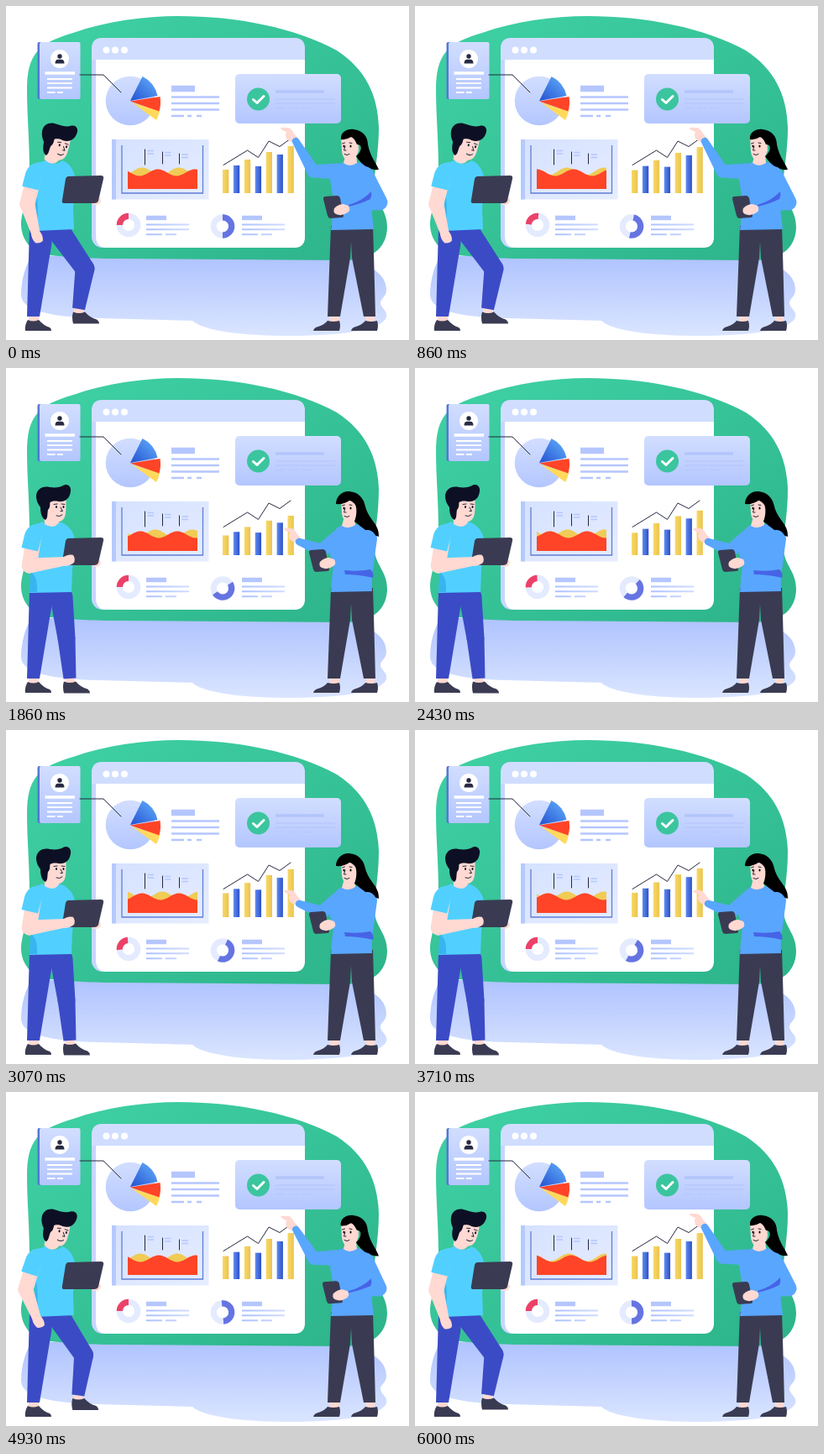
An HTML page for the animation above (6070 ms loop, 480x398 px).

```html
<!DOCTYPE html>
<html lang="en">
<head>
<meta charset="utf-8">
<title>Team dashboard</title>
<style>
html, body { margin: 0; width: 100%; height: 100%; overflow: hidden; background: #fff; }
svg { display: block; width: 480px; height: 398px; }
.skin { fill: #ffd9d2; }
.hair { fill: #0d1024; }
.black { fill: #000; }
.line { fill: none; stroke: #25283f; stroke-width: 1; stroke-linecap: round; stroke-linejoin: round; }
.dark { fill: #3a3b52; }
.sky { fill: #51d0ff; }
.blue { fill: #59a6ff; }
.jean { fill: #3b4bc6; }
.text { stroke: #b5c6ff; fill: none; }
</style>
</head>
<body>
<svg viewBox="0 0 480 398">
  <defs>
    <linearGradient id="green" x2="1" y2="1"><stop stop-color="#3fd2a5"/><stop offset="1" stop-color="#2db389"/></linearGradient>
    <linearGradient id="ground" x2="0" y2="1"><stop stop-color="#afc3ff"/><stop offset="1" stop-color="#dae5ff"/></linearGradient>
    <linearGradient id="pale" x2="0" y2="1"><stop stop-color="#d2deff"/><stop offset="1" stop-color="#b3c6ff"/></linearGradient>
    <linearGradient id="panel" x2="1" y2="1"><stop stop-color="#d5e1ff"/><stop offset="1" stop-color="#e6edff"/></linearGradient>
    <linearGradient id="slice" y1="1" x2="1" y2="0"><stop stop-color="#2450cf"/><stop offset="1" stop-color="#65b4ff"/></linearGradient>
    <linearGradient id="fade"><stop stop-color="#adc1ff"/><stop offset="1" stop-color="#d0dcff"/></linearGradient>
    <linearGradient id="gold"><stop stop-color="#f7d966"/><stop offset="1" stop-color="#ecc350"/></linearGradient>
    <linearGradient id="navy"><stop stop-color="#5f8cf0"/><stop offset="1" stop-color="#2d50c8"/></linearGradient>
  </defs>

  <path fill="url(#ground)" d="M30 298C20 316 18 333 18 345C19 362 50 371 110 372L222 375C235 388 290 393 335 393C400 393 446 387 453 371C455 363 447 361 446 354C446 348 453 347 453 338C453 320 435 308 400 298Z"/>
  <path fill="url(#green)" d="M25 100C25 58 38 44 80 32C120 18 165 12 205 12C275 12 345 26 394 53C428 75 443 106 444 145C444 180 437 202 439 219C442 237 454 243 454 264C453 290 435 303 400 303L130 301C95 301 75 299 50 297C30 294 18 278 18 260C18 245 28 225 28 195C28 160 25 130 25 100Z"/>

  <!-- window -->
  <rect x="102" y="38" width="254" height="250" rx="13" fill="#c6d5ff"/>
  <path fill="#fff" d="M107 64H356V275Q356 288 343 288H120Q107 288 107 274Z"/>
  <path fill="#d0ddff" d="M102 64V51Q102 38 115 38H343Q356 38 356 51V64Z"/>
  <g fill="#fff"><circle cx="119.500" cy="52.500" r="4"/><circle cx="130" cy="52.500" r="4"/><circle cx="141" cy="52.500" r="4"/></g>

  <!-- profile card -->
  <rect x="37.500" y="43" width="8" height="68" rx="2" fill="#5576d8"/>
  <rect x="40" y="43" width="48.500" height="68" rx="2" fill="url(#pale)"/>
  <circle cx="64" cy="63" r="11" fill="#fff"/>
  <circle cx="64" cy="60" r="2.700" fill="#272a42"/>
  <path fill="#272a42" d="M58.500 68.500Q58.500 63.800 62 63.800H66Q69.500 63.800 69.500 68.500Z"/>
  <path stroke="#fff" stroke-width="3.500" d="M46.500 80H82"/>
  <path stroke="#fff" stroke-width="1.800" d="M49 87H79M49 92.200H79M49 97.500H79M49 103H58.500M61 103H68"/>

  <!-- pie -->
  <circle cx="148" cy="113" r="29.300" fill="url(#pale)"/>
  <path fill="url(#slice)" d="M148 113L162.500 84Q177 91 180.500 107Z"/>
  <path fill="#ffd95c" d="M150 115L183 125Q182 131 179 136Z"/>
  <path fill="#ff4427" d="M148 113.500L183.500 108Q185 117 182.500 125.500Z"/>
  <path class="line" d="M88 82H116L137 103"/>

  <g class="text">
    <path stroke-width="7.500" d="M197 98.500H225"/>
    <path stroke-width="2.600" d="M197 108.500H254M197 116H254M197 123.500H254M197 131H212M216 131H221M227 131H233"/>
    <g id="note">
      <path stroke-width="5.500" d="M167 252.500H191"/>
      <path stroke="url(#fade)" stroke-width="2" d="M167 260.500H218M167 266.300H218M167 272.300H186M190 272.300H203"/>
    </g>
    <use href="#note" x="114"/>
  </g>

  <!-- message card -->
  <rect x="273" y="81" width="126" height="59" rx="5" fill="url(#pale)"/>
  <circle cx="300.500" cy="111" r="13.500" fill="#3bc59e"/>
  <path d="M294.500 111.500L299 115.500L307 107.500" fill="none" stroke="#fff" stroke-width="3" stroke-linecap="round" stroke-linejoin="round"/>
  <path stroke="#b3c5fb" stroke-width="3.500" d="M321 102H379"/>
  <path stroke="#b6c8fd" stroke-width="1.500" d="M321 111H392M321 116H392M321 121.500H332M337 121.500H347M351 121.500H365"/>

  <!-- area chart -->
  <rect x="126" y="159" width="115.500" height="71.500" fill="url(#panel)"/>
  <rect x="126" y="159" width="5" height="71.500" fill="#b6c9fc"/>
  <path fill="none" stroke="#5f7fd6" stroke-width="1.300" d="M138 166V223H234.500V166"/>
  <path id="waveBack" fill="#f0cb55"/>
  <path id="waveFront" fill="#ff4427"/>
  <path class="line" stroke-width=".8" d="M165.500 171V189M186.500 174V188M206.500 176V188"/>
  <path class="text" stroke-width="1.500" d="M168.500 172.500H176M168.500 176H176M189 174.500H196.500M189 178H196.500M209.500 177H217M209.500 180.500H217"/>

  <!-- bar chart -->
  <g id="bars"></g>
  <path class="line" d="M259 189.500L287.500 172L300.500 180.500L313 161L326 167.500L339 158"/>

  <!-- rings -->
  <g fill="none" stroke-width="7.200">
    <circle cx="146" cy="261" r="10.700" stroke="#e4ebff"/>
    <circle id="ringPink" cx="146" cy="261" r="10.700" stroke="#ec4168" pathLength="4" stroke-dasharray="1 3"/>
    <circle cx="258" cy="262.500" r="10.700" stroke="#e4ebff"/>
    <circle id="ringBlue" cx="258" cy="262.500" r="10.700" stroke="#6674e2" pathLength="4" stroke-dasharray="2 2"/>
  </g>

  <!-- man -->
  <path class="skin" id="manAnkle"/>
  <path class="jean" id="manThigh"/><path class="jean" id="manShank"/>
  <path class="dark" id="manShoe" d="M0 1Q7 4 14 1Q20 8 28 10Q31 12 31 15H0Q-2 7 0 1Z"/>
  <path class="skin" d="M27 368H39V378H27Z"/>
  <path class="jean" d="M28 265H56Q55 285 51 304L40 370H25Z"/>
  <path class="dark" d="M26 374Q32 377 39 374Q45 381 52 383Q54 384 54 387H23Q22 380 26 374Z"/>
  <path class="sky" id="manTorso"/>
  <path fill="#38b5f0" id="manShade"/>
  <g id="manHead">
    <path class="skin" d="M45 172L62 176L63 184Q57 193 46 186Z"/>
    <path class="skin" d="M47 156L71 154C72 161 71.500 167 71 173C70 181 65 184 60 183C55 182 51 180 47 176Z"/>
    <path class="hair" d="M36 153C36 145 43 140 52 142C59 143 65 142 68 140C74 137 78 142 77 147C76 156 70 160 62 159C58 158 54 159 52.500 160C52 163 53 166 50 169C49 174 50 179 47 181C42 179 41 171 41 166C38 162 36 158 36 153Z"/>
    <path class="line" stroke-width=".9" d="M57 162.500L61 162M66 162L70 162.500M65 166L67.500 170.500H65M60 176Q64 178 67 175"/>
    <g id="manEyes" class="hair"><ellipse cx="60" cy="165.500" rx="1" ry="1.500"/><ellipse cx="68.500" cy="165.500" rx="1" ry="1.500"/></g>
  </g>
  <path class="skin" d="M103 228Q113 227 113 232Q112 237 106 237L102 235Z"/>
  <path class="dark" d="M74 203L113 202Q117 202 116 206L110 232Q109 235 105 235L69 235Q66 235 67 231L71 206Q72 203 74 203Z"/>
  <path class="skin" id="manUpper"/><path class="skin" id="manFore"/>
  <path class="skin" id="manHand" d="M-4 -5Q3 -8 9 -5Q11 0 8 4Q2 7 -4 5Z"/>
  <path class="sky" id="manSleeve"/>

  <!-- woman -->
  <path class="skin" d="M386 368H397V378H386ZM429 368H439V378H429Z"/>
  <path class="dark" d="M387 262H412L410 300L398 370H383ZM410 262H437Q438 290 440 370H426L412 300Z"/>
  <path class="dark" id="shoe" d="M383 375Q390 377 397 375Q399 381 397 387H366Q367 383 372 382Q379 380 383 375Z"/>
  <use href="#shoe" x="45"/>
  <path class="blue" id="torso"/>
  <path class="skin" id="neck"/>
  <path class="skin" d="M399 156L419 155L420 172Q417 184 408 184Q401 183 400 173Z"/>
  <path class="line" stroke-width=".9" d="M400.500 164L403.500 163M409 163L412 163.500M404 167L402.500 172H405M403 176.500Q406 179 409 176.500"/>
  <g class="black"><ellipse cx="402.500" cy="167" rx="1" ry="1.500"/><ellipse cx="410.500" cy="167" rx="1" ry="1.500"/></g>
  <path class="black" id="hair"/>
  <path class="skin" id="hand" d="M5 -1L-2 -9Q-6 -17 -11 -16Q-18 -17 -18 -15Q-17 -13 -11 -11Q-13 -7 -11 -3Q-8 1 -3 1L1 4Z"/>
  <path class="blue" id="upper"/><path class="blue" id="fore"/>
  <path class="blue" id="backUpper"/><path class="blue" id="backFore"/>
  <path fill="#4664e6" id="fold"/>
  <g id="phone">
    <path class="dark" d="M380 227L394 226Q397 226 398 229L402 250Q402 252 400 252L386 253Q384 253 383 250L378 230Q378 227 380 227Z"/>
    <path class="skin" d="M391 241Q396 236 402 236L408 238Q411 243 407 246Q400 251 393 248Q389 246 391 241Z"/>
  </g>
</svg>
<script>
const LOOP = 6070, STEP = LOOP / 85;
const $ = id => document.getElementById(id);
const set = (id, name, value) => $(id).setAttribute(name, value);
const lerp = (a, b, p) => a + (b - a) * p;
const point = (a, b, p) => [lerp(a[0], b[0], p), lerp(a[1], b[1], p)];
const move = (id, [x, y], more = '') => set(id, 'transform', `translate(${x} ${y}) ${more}`);

// Blend two paths that share the same commands.
function morph(a, b, p) {
  const nums = b.match(/-?[\d.]+/g);
  let i = 0;
  return a.replace(/-?[\d.]+/g, n => lerp(+n, +nums[i++], p).toFixed(2));
}

// Tapered limb, round at the start and round or flat at the end.
function limb(a, b, wa, wb, flat = false) {
  const d = Math.atan2(b[1] - a[1], b[0] - a[0]) + Math.PI / 2;
  const at = (c, r) => (c[0] + r * Math.cos(d)).toFixed(2) + ' ' + (c[1] + r * Math.sin(d)).toFixed(2);
  const ra = wa / 2, rb = wb / 2;
  const end = flat ? 'L' : `A${rb} ${rb} 0 0 1 `;
  return `M${at(a, -ra)}L${at(b, -rb)}${end}${at(b, rb)}L${at(a, ra)}A${ra} ${ra} 0 0 1 ${at(a, -ra)}Z`;
}

const polar = ([x, y], r, deg) => [x + r * Math.cos(deg * Math.PI / 180), y + r * Math.sin(deg * Math.PI / 180)];

function ease(x) {
  x = Math.max(0, Math.min(1, x));
  return x < .5 ? 4 * x ** 3 : 1 - 4 * (1 - x) ** 3;
}

function track(keys, t) {
  let i = 0;
  while (i < keys.length - 2 && t >= keys[i + 1][0]) i++;
  const [t0, a] = keys[i], [t1, b] = keys[i + 1];
  return lerp(a, b, (1 - Math.cos(Math.PI * (t - t0) / (t1 - t0))) / 2);
}

const KEYS = {
  bar: [[0, 1], [430, .93], [860, .98], [1350, 1.04], [1860, .84], [2450, .95], [3070, 1.02], [3500, 1.07], [4000, .9], [4430, .95], [4930, .98], [5500, 1.05], [6000, .98], [LOOP, 1]],
  blue: [[0, 0], [860, 12], [1860, 57], [3070, 25], [4430, 38], [4930, -5], [5500, -12], [LOOP, 0]],
  pink: [[0, 0], [860, 5], [1860, 0], [3070, -5], [4430, 8], [4930, 0], [LOOP, 0]],
  front: [[0, 181], [860, 189], [1860, 204], [3070, 206], [4430, 196], [4930, 182], [6000, 186], [LOOP, 181]],
  back: [[0, 162], [860, 181], [1860, 178], [3070, 186], [4430, 172], [4930, 160], [6000, 183], [LOOP, 162]]
};

const BARS = [28, 33, 40, 32, 49, 46, 56].map((h, i) => {
  const r = document.createElementNS('http://www.w3.org/2000/svg', 'rect');
  r.setAttribute('x', 258 + i * 12.92);
  r.setAttribute('width', 7.3);
  r.setAttribute('fill', i % 2 ? 'url(#navy)' : 'url(#gold)');
  $('bars').append(r);
  return { r, h };
});

function wave(peak, amp, mid) {
  let d = 'M145 218';
  for (let x = 145; x <= 228; x++) d += `L${x} ${(mid - amp * Math.cos((x - peak) * 2 * Math.PI / 44)).toFixed(2)}`;
  return d + 'V218Z';
}

function drawCharts(t) {
  const k = track(KEYS.bar, t);
  for (const { r, h } of BARS) {
    r.setAttribute('y', 223 - h * k);
    r.setAttribute('height', h * k);
  }
  set('ringBlue', 'transform', `rotate(${track(KEYS.blue, t) - 90} 258 262.5)`);
  set('ringPink', 'transform', `rotate(${track(KEYS.pink, t) + 180} 146 261)`);
  set('waveBack', 'd', wave(track(KEYS.back, t), 4.5, 197));
  set('waveFront', 'd', wave(track(KEYS.front, t), 4, 198.5));
}

function drawMan(p, t) {
  const hip = [66, 273], knee = point([94, 313], [72, 322], p), ankle = point([86.5, 361], [76, 370], p);
  set('manThigh', 'd', limb(hip, knee, 27, lerp(23, 21, p)));
  set('manShank', 'd', limb(knee, ankle, lerp(23, 21, p), 15, true));
  set('manAnkle', 'd', limb(ankle, [ankle[0] + .5, ankle[1] + 6], 11, 11, true));
  move('manShoe', point([80, 363.5], [69, 372.5], p));

  set('manTorso', 'd', morph(
    'M47 184C55 189 62 189 67 184C77 187 82 198 83 210L80 240L81 266L36 268C36 250 34 235 33 215L36 195C36 190 40 186 47 184Z',
    'M43 183C50 188 57 188 62 183C73 185 82 194 83 210L79 240L78 267L28 268C30 250 30 235 30 215L33 195C34 190 38 185 43 183Z', p));
  set('manShade', 'd', morph('M36 222Q40 245 36 267L36 267L35 235Z', 'M29 243Q38 247 37 267L28 267L29 245Z', p));

  const swing = Math.sin(Math.PI * p) * 16;
  const shoulder = point([35, 197], [34, 196], p);
  const elbow = polar(shoulder, 40, lerp(104, 99, p) + swing);
  const hand = polar(elbow, lerp(39, 45, p), lerp(74, -7, p));
  set('manUpper', 'd', limb(shoulder, elbow, 18, 18));
  set('manFore', 'd', limb(elbow, hand, 18, 10));
  move('manHand', hand, `rotate(${lerp(70, -15, p)})`);
  const deg = lerp(104, 103, p) + swing;
  const cuff = polar(shoulder, 21, deg);
  const side = s => polar(cuff, s, deg + 90).join(' ');
  const [x, y] = shoulder;
  set('manSleeve', 'd', `M${x + 8} ${y - 11}Q${x - 8} ${y - 11} ${x - 12} ${y + 3}L${side(11)}L${side(-9)}L${x + 10} ${y}Z`);

  set('manHead', 'transform', `translate(0 ${lerp(-1.5, 0, p)}) rotate(${lerp(13, 0, p)} 54 183)`);
  const blink = [320, 2290, 4220].some(b => Math.abs(t - b) < 110);
  set('manEyes', 'transform', blink ? 'translate(0 148.95) scale(1 .1)' : '');
}

function drawWoman(p) {
  set('hair', 'd', morph(
    'M399 159C398 150 407 146 414 147C425 148 431 156 431 165C434 180 440 185 444 195C436 196 425 192 417 179C424 174 425 164 418 165C416 160 414 157 411 156Q405 160 399 159Z',
    'M393 162C393 152 402 146 409 147C420 148 426 155 428 165C432 181 445 186 444 201C433 198 423 189 415 183C418 176 418 166 416 163C414 160 411 158 409 158Q402 163 393 162Z', p));
  set('torso', 'd', morph(
    'M401 186Q409 192 418 186C430 188 437 195 440 206L434 232Q436 250 438 266L387 267Q389 250 391 237L386 207Q387 192 401 186Z',
    'M400 187Q408 193 416 186C430 188 443 193 442 204L438 232Q435 250 436 266L387 267Q388 250 390 235L384 215Q387 193 400 187Z', p));
  set('neck', 'd', morph('M405 176L417 174L418 187Q409 193 402 187Z', 'M403 177L415 175L416 187Q408 193 400 188Z', p));

  const shoulder = point([394, 197], [395, 203], p);
  const elbow = point([366, 197], [376, 217], p);
  const wrist = point([345, 161], [349, 207], p);
  set('upper', 'd', limb(shoulder, elbow, 19, 15));
  set('fore', 'd', limb(elbow, wrist, 15, 8.5));
  move('hand', wrist);

  const s = point([427, 202], [430, 204], p);
  const e = point([445, 234], [428, 237], p);
  const w = point([410, 242], [396, 232], p);
  set('backUpper', 'd', limb(s, e, 22, 19));
  set('backFore', 'd', limb(e, w, 17, 11));
  set('fold', 'd', morph(
    'M408 237Q425 232 435 221Q436 226 434 230Q422 236 408 239Z',
    'M403 241Q420 243 434 240Q439 245 437 250Q420 246 404 246Z', p));
  move('phone', point([0, 0], [-17, -10], p));
}

function frame(now) {
  const t = Math.floor((now % LOOP) / STEP + 1e-6) * STEP;
  const pose = ease((t - 860) / 570) - ease((t - 4500) / 570);
  drawCharts(t);
  drawMan(pose, t);
  drawWoman(pose);
}

const start = performance.now();
function tick() {
  frame(performance.now() - start);
  requestAnimationFrame(tick);
}
tick();
</script>
</body>
</html>
```
